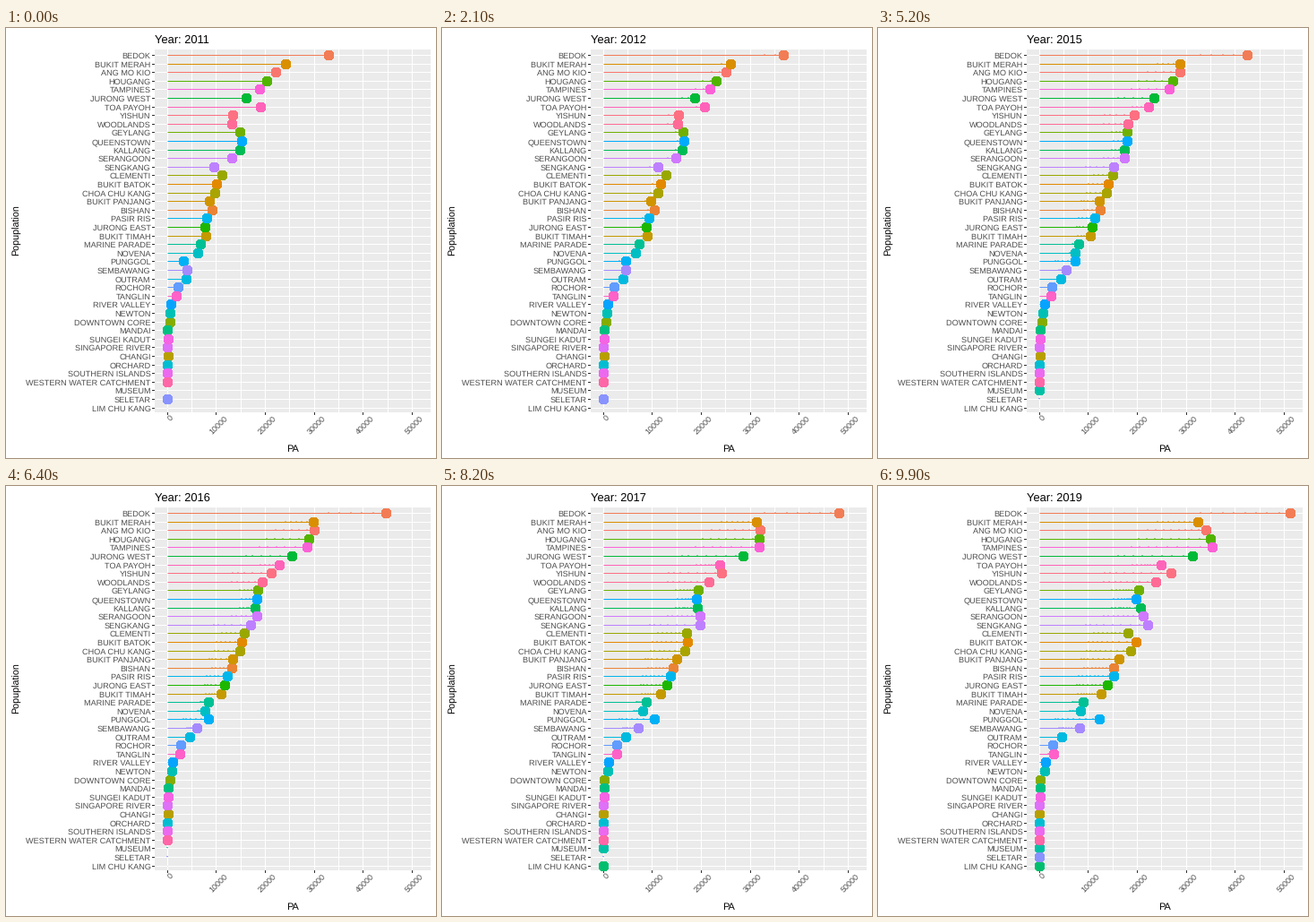
A matplotlib script that plays this animation: 480x480 px, repeating every 10000 ms.

```python
import numpy as np
import matplotlib.pyplot as plt
from matplotlib.animation import FuncAnimation
from matplotlib.collections import LineCollection
from matplotlib.patches import Rectangle

plt.rcParams["font.family"] = ["Liberation Sans", "DejaVu Sans"]
plt.rcParams["text.hinting"] = "no_hinting"

SIZE, DPI, FRAMES = 480, 100, 100
PX = 72 / DPI
X0, PER_HUNDRED = 180.3, 0.546
Y0, STEP = 30.5, 9.6
LEFT, RIGHT, TOP, BOTTOM = 166, 474, 24, 429

# Residents in hundreds at four moments; a cubic joins them.
KNOTS = (0, 35, 64, 99)
AREAS = {
    "BEDOK": (330, 395, 448, 513),
    "BUKIT MERAH": (242, 273, 299, 325),
    "ANG MO KIO": (222, 268, 301, 341),
    "HOUGANG": (204, 249, 290, 350),
    "TAMPINES": (189, 238, 286, 354),
    "JURONG WEST": (162, 207, 255, 314),
    "TOA PAYOH": (191, 215, 229, 249),
    "YISHUN": (134, 171, 213, 270),
    "WOODLANDS": (132, 165, 195, 238),
    "GEYLANG": (149, 171, 185, 204),
    "QUEENSTOWN": (152, 173, 184, 198),
    "KALLANG": (149, 167, 180, 207),
    "SERANGOON": (132, 160, 184, 213),
    "SENGKANG": (96, 129, 171, 222),
    "CLEMENTI": (112, 138, 158, 182),
    "BUKIT BATOK": (101, 127, 152, 198),
    "CHOA CHU KANG": (97, 123, 149, 187),
    "BUKIT PANJANG": (86, 108, 134, 163),
    "BISHAN": (92, 114, 132, 152),
    "PASIR RIS": (81, 103, 123, 152),
    "JURONG EAST": (77, 97, 118, 140),
    "BUKIT TIMAH": (79, 97, 110, 127),
    "MARINE PARADE": (68, 77, 85, 90),
    "NOVENA": (63, 70, 77, 85),
    "PUNGGOL": (33, 57, 85, 123),
    "SEMBAWANG": (41, 50, 61, 83),
    "OUTRAM": (39, 42, 46, 46),
    "ROCHOR": (22, 24, 27, 28),
    "TANGLIN": (19, 22, 26, 30),
    "RIVER VALLEY": (8, 10, 11, 13),
    "NEWTON": (6, 8, 9, 11),
    "DOWNTOWN CORE": 6,
    "MANDAI": (1, 2, 2, 2),
    "SUNGEI KADUT": 1.5,
    "SINGAPORE RIVER": 1,
    "CHANGI": 2,
    "ORCHARD": 0.5,
    "SOUTHERN ISLANDS": 0,
    "WESTERN WATER CATCHMENT": 0,
    "MUSEUM": 0,
    "SELETAR": 0,
    "LIM CHU KANG": 0,
}
NAMES = list(AREAS)
YEARS = np.arange(2011, 2020)
KEYS = np.round((YEARS - 2011) / 8 * (FRAMES - 1))
MISSING = {
    "MUSEUM": (2011, 2012, 2014, 2016),
    "SELETAR": (2014, 2015, 2016, 2017, 2018),
    "LIM CHU KANG": (2011, 2012, 2013, 2014, 2015, 2016),
}


def hcl(hue, chroma=100, lum=65):
    a = np.radians(hue)
    y = ((lum + 16) / 116) ** 3
    u = chroma * np.cos(a) / (13 * lum) + 0.1978398
    v = chroma * np.sin(a) / (13 * lum) + 0.4683363
    x = 9 * y * u / (4 * v)
    z = -x / 3 - 5 * y + 3 * y / v
    m = np.array([[3.240479, -1.537150, -0.498535],
                  [-0.969256, 1.875992, 0.041556],
                  [0.055648, -0.204043, 1.057311]])
    c = np.clip(m @ (x, y, z), 0, 1)
    return np.where(c > 0.00304, 1.055 * c ** (1 / 2.4) - 0.055, 12.92 * c)


def yearly(name):
    v = AREAS[name]
    if isinstance(v, tuple):
        return np.polyval(np.polyfit(KNOTS, v, 3), KEYS)
    out = np.full(len(YEARS), float(v))
    if name in ("DOWNTOWN CORE", "CHANGI"):
        out[YEARS >= 2017] = v / 3
    return out


def to_x(hundreds):
    return X0 + PER_HUNDRED * hundreds


def snap(v):
    """Centre of the pixel that holds v."""
    return np.floor(v) + 0.5


# Alphabetical order sets both hue and stacking.
ORDER = sorted(NAMES)
COLORS = [hcl(15 + 360 * i / len(ORDER)) for i in range(len(ORDER))]
VALUES = np.array([yearly(n) for n in ORDER])
SHOWN = np.array([[y not in MISSING.get(n, ()) for y in YEARS] for n in ORDER])
ROW_Y = snap(np.array([Y0 + STEP * NAMES.index(n) for n in ORDER]) + 1e-6)

fig = plt.figure(figsize=(SIZE / DPI, SIZE / DPI), dpi=DPI, facecolor="white")
ax = fig.add_axes([0, 0, 1, 1])
ax.set(xlim=(0, SIZE), ylim=(SIZE, 0))
ax.axis("off")


def line(x, y, color):
    ax.plot(x, y, color=color, lw=PX, snap=False,
            solid_capstyle="butt", zorder=1)


def label(x, y, s, size, color="black", **kw):
    return ax.text(x, y, s, fontsize=size * PX, color=color, **kw)


def hairlines(colors, z, **kw):
    lines = LineCollection([], colors=colors, linewidths=PX, zorder=z, **kw)
    lines.set_snap(False)
    return ax.add_collection(lines, autolim=False)


ax.add_patch(Rectangle((LEFT, TOP), RIGHT - LEFT, BOTTOM - TOP,
                       fc="#EBEBEB", lw=0, zorder=0))
for i, name in enumerate(NAMES):
    y = Y0 + STEP * i
    row = (snap(y + 1e-6),) * 2
    line((LEFT, RIGHT), row, "white")
    line((LEFT - 3, LEFT), row, "#333333")
    label(161.6, y + 3.4, name, 9.2, "#4D4D4D", ha="right", va="baseline")
for n in range(0, 55000, 5000):
    x = to_x(n / 100)
    line((snap(x),) * 2, (TOP, BOTTOM), "white")
    if n % 10000 == 0:
        line((snap(x),) * 2, (BOTTOM, BOTTOM + 3), "#333333")
        k = len(str(n)) - 1
        label(x + 3 - 0.2 * k, 436 + 1.9 * k, str(n), 9, "#4D4D4D",
              rotation=45, ha="center", va="center")
label(320, 473, "PA", 11, ha="center", va="baseline")
label(12, 226, "Popuplation", 10.8, rotation=90, ha="center", va="center")
title = label(166, 17.3, "", 12.9, va="baseline")

sticks = hairlines(COLORS, 3)

# Each year leaves a small tick just above its stick.
marks = [(KEYS[j], np.floor(to_x(VALUES[i, j])), ROW_Y[i] - 1, COLORS[i])
         for i in range(len(ORDER)) for j in range(len(YEARS)) if SHOWN[i, j]]
trail = hairlines([], 4, alpha=0.5)

dots = ax.scatter(np.full(len(ORDER), X0), ROW_Y, s=(11 * PX) ** 2,
                  c=COLORS, linewidths=0, antialiased=False, zorder=5)


def draw(k):
    now = np.searchsorted(KEYS, k, side="right") - 1
    x = to_x(np.array([np.interp(k, KEYS, v) for v in VALUES]))
    x = np.where(SHOWN[:, now], snap(x), np.nan)
    end = np.where(np.isnan(x), X0, x)
    sticks.set_segments([((snap(X0), y), (e, y)) for e, y in zip(end, ROW_Y)])
    dots.set_offsets(np.column_stack([x, ROW_Y]))
    past = [m for m in marks if m[0] < k]
    trail.set_segments([((mx - 1, my), (mx + 1, my)) for _, mx, my, _ in past])
    trail.set_color([c for *_, c in past])
    title.set_text(f"Year: {2011 + 8 * k // (FRAMES - 1)}")
    return sticks, trail, dots, title


anim = FuncAnimation(fig, draw, frames=FRAMES, interval=100,
                     repeat=True, repeat_delay=0, blit=False)
plt.show()
```
